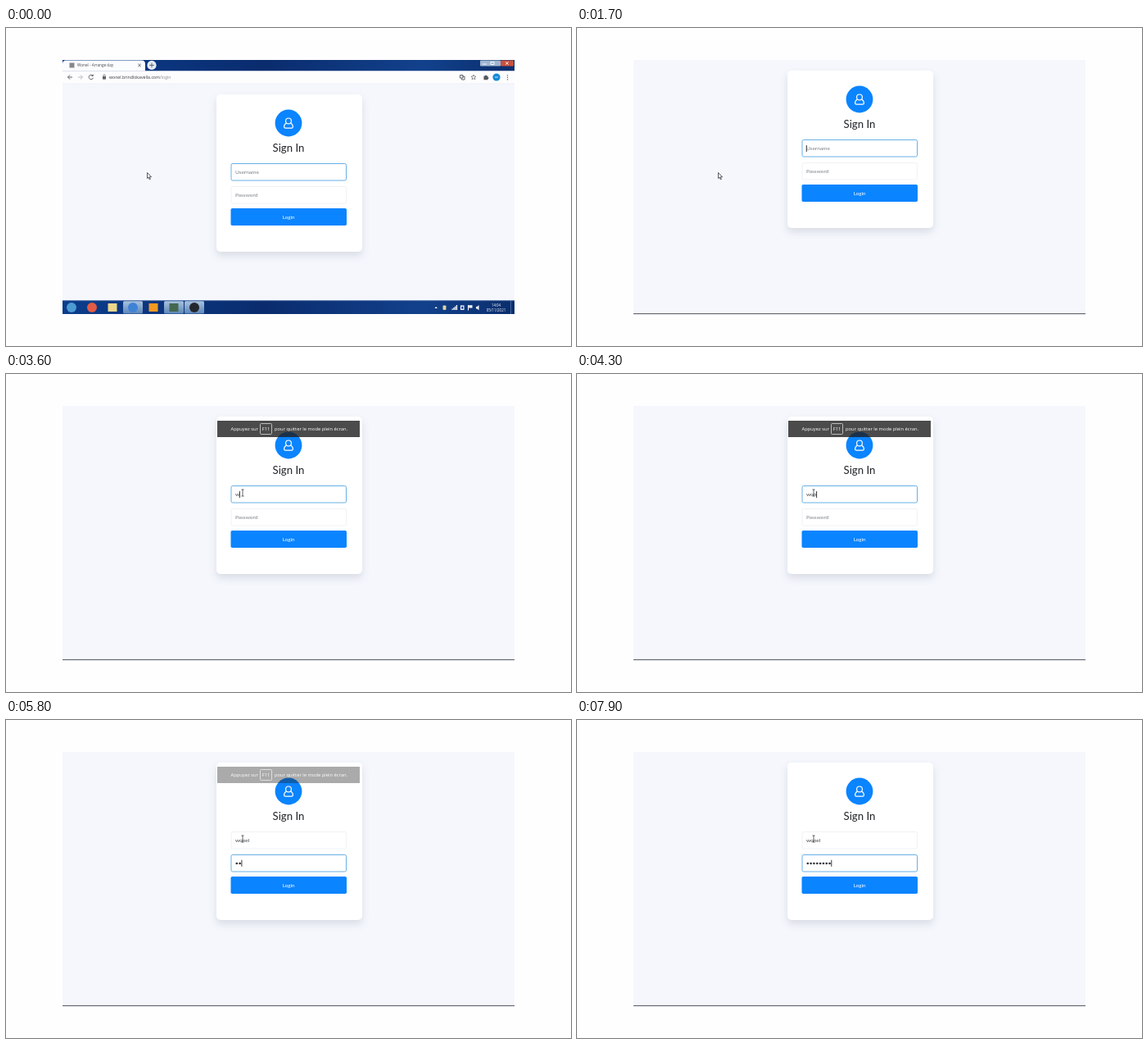
Write an HTML page that moves like this. It is 690 px wide and 388 px high and loops after 8000 ms.

```html
<!DOCTYPE html>
<html lang="en">
<head>
<meta charset="utf-8">
<title>Sign in</title>
<style>
  html, body { margin: 0; width: 100%; height: 100%; overflow: hidden; background: #fefefe; }
  svg { display: block; width: 690px; height: 388px; }
  text { font-family: "Open Sans", "Noto Sans", sans-serif; white-space: pre; }
  #form text { font-family: Lato, sans-serif; font-size: 6.5px; fill: #41464b; }
  #form .hint { fill: #7b8289; }
  #form .title { font-size: 13.2px; fill: #212529; }
  #form .button { font-size: 6.3px; fill: #fff; }
  .mid { text-anchor: middle; }
  .field { fill: #fff; stroke: #f1f2f4; }
  .focus { stroke: #68b0e6; }
  .line { fill: none; stroke: #5f6368; stroke-width: 1; }
  .card { filter: drop-shadow(0 5px 5px rgba(40, 50, 70, .13)); }
  #toast text { font-size: 5.8px; fill: #fff; }
</style>
</head>
<body>
<svg viewBox="0 0 690 388">
  <defs>
    <linearGradient id="bar">
      <stop offset="0" stop-color="#0b3d8c"/>
      <stop offset=".45" stop-color="#0a2c6e"/>
      <stop offset=".8" stop-color="#12418c"/>
      <stop offset="1" stop-color="#0a2d6c"/>
    </linearGradient>
    <linearGradient id="lit" x2="0" y2="1">
      <stop offset="0" stop-color="#a9c3df"/>
      <stop offset="1" stop-color="#5d86b8"/>
    </linearGradient>
  </defs>

  <rect x="69" y="39" width="552" height="310" fill="#f5f7fd"/>
  <rect id="edge" x="69" y="348" width="552" height="1.2" fill="#656a78"/>

  <g id="form">
    <rect class="card" x="257" y="81" width="178" height="192" rx="5" fill="#fff"/>
    <circle cx="345" cy="116" r="16.4" fill="#0a84ff"/>
    <g fill="none" stroke="#fff" stroke-width="1.2">
      <circle cx="345" cy="113.4" r="3.4"/>
      <path d="M342.3 116.2c-2 .9-2.7 2.4-2.7 4.3q0 1.7 1.6 1.7h7.6q1.6 0 1.6-1.7c0-1.9-.7-3.4-2.7-4.3"/>
    </g>
    <text class="title mid" x="345" y="150.6">Sign In</text>
    <rect id="nameBox" class="field" x="275" y="165.5" width="140.5" height="20.5" rx="1.8"/>
    <text id="name" x="280" y="178.4"></text>
    <rect id="passBox" class="field" x="275" y="193.5" width="140.5" height="20.5" rx="1.8"/>
    <text id="pass" class="hint" x="280" y="206">Password</text>
    <g id="dots" fill="#33383d"></g>
    <rect id="caret" width=".9" height="8" fill="#222"/>
    <rect x="274.5" y="220" width="141.5" height="21" rx="1.8" fill="#0a84ff"/>
    <text class="button mid" x="345.2" y="232.6">Login</text>
  </g>

  <g id="browser">
    <rect x="69" y="39" width="552" height="13.5" fill="url(#bar)"/>
    <path d="M69 52.5V44q0-4.5 4-4.5h93q4 0 4 4.5v8.5z" fill="#fbfcfe"/>
    <rect x="77.5" y="42.5" width="6" height="6" fill="#85898e"/>
    <text x="87" y="47.3" font-size="4.7" fill="#44484d">Wonel - Arrange day</text>
    <path class="line" d="M161.4 43.8l3.4 3.4m0-3.4l-3.4 3.4"/>
    <circle cx="178" cy="45.4" r="5.6" fill="#e3ebf6"/>
    <path class="line" d="M175.2 45.4h5.6m-2.8-2.8v5.6"/>
    <rect x="579" y="39.5" width="25" height="7" rx="1" fill="#9fb5d2"/>
    <rect x="604" y="39.5" width="16" height="7" rx="1" fill="#c9513f"/>
    <path d="M582 44h5m5-2.5h4v3h-4zM610 41.3l3.6 3.4m0-3.4l-3.6 3.4" stroke="#fff" fill="none" stroke-width=".9"/>
    <rect x="69" y="52.5" width="552" height="15.5" fill="#fdfdfe"/>
    <path d="M69 68h552" stroke="#e9ebef" stroke-width=".8"/>
    <path class="line" d="M81 60h-5.5m2.6-2.6L75.500 60l2.600 2.600"/>
    <path class="line" d="M88 60h5.500m-2.600-2.600L93.500 60l-2.600 2.600" style="stroke:#b9bcc1"/>
    <path class="line" d="M106 58.200a2.700 2.700 0 1 0 .5 2.500m-.2-4v1.800h-1.800"/>
    <rect x="118" y="59" width="4" height="3.600" fill="#5f6368"/>
    <path class="line" d="M118.800 59v-1a1.200 1.200 0 0 1 2.400 0v1" style="stroke-width:.7"/>
    <text x="126" y="62" font-size="5.2" fill="#34373b">wonel.brindlokavella.com<tspan fill="#85898e">/login</tspan></text>
    <path d="M554.500 57.500h3.500v3.500h-3.500zm3 1.500h2.500v4h-3.500v-1.500" class="line"/>
    <path d="M571 57l.9 2 2.100.2-1.600 1.400.5 2.100-1.900-1.100-1.900 1.100.5-2.100-1.600-1.400 2.100-.2z" class="line" style="stroke-width:.7"/>
    <path d="M583.500 58.500h1.500a1 1 0 0 1 2 0h1.500v1.500a1 1 0 0 1 0 2v1.200h-5z" fill="#53575c"/>
    <circle cx="599" cy="60" r="4.600" fill="#168ad8"/>
    <path d="M597 60h4" stroke="#cfe8fa"/>
    <path d="M612.500 57.200v6.500" stroke="#5f6368" stroke-width="1.200" stroke-dasharray="1.200 1.300"/>

    <rect x="69" y="332.500" width="552" height="16.500" fill="url(#bar)"/>
    <path d="M69 332.800h552" stroke="#44699f" stroke-width=".6"/>
    <g id="tasks"></g>
    <g fill="#fff">
      <path d="M523.500 342l1.700-2 1.700 2z"/>
      <rect x="533.500" y="338.500" width="4" height="5.500" rx="1" fill="#d8d4a6"/>
      <path d="M544.500 344v-1.500h1.300v1.500zm1.800 0v-3h1.300v3zm1.800 0v-4.500h1.300v4.500zm1.800 0v-6h1.200v6z"/>
      <path d="M555 338.500h4.500v5.500H555zm1.200 1.200v3h2.200v-3z" fill-rule="evenodd"/>
      <path d="M564 338h1v6.500h-1zm1.200.3h4.300v3.200h-4.300z"/>
      <path d="M574 340h1.500l2-2v6.500l-2-2H574z"/>
    </g>
    <g class="mid" font-size="4.400" fill="#fff">
      <text x="598.500" y="339.800">14:04</text>
      <text x="598.500" y="346.300">05/11/2021</text>
    </g>
    <path d="M616.500 333v16" stroke="#5f82b4" stroke-width=".7"/>
  </g>

  <g id="toast">
    <rect x="258" y="57" width="174" height="20" fill="rgba(30,30,30,.8)"/>
    <rect x="310.500" y="60.500" width="14" height="13" rx="1" fill="none" stroke="#d8d8d8" stroke-width=".8"/>
    <text x="274.500" y="69.200">Appuyez sur</text>
    <text class="mid" x="317.500" y="69.200">F11</text>
    <text x="328" y="69.200">pour quitter le mode plein écran.</text>
  </g>

  <path id="arrow" d="M0 0v7l1.600-1.400 1.100 2.700 1.200-.5-1.100-2.600h2.200z" fill="#fff" stroke="#30343a" stroke-width=".8"/>
  <path id="beam" d="M-1.500-4h3M0-4v8M-1.500 4h3" fill="none" stroke="#3a3d42" stroke-width=".8"/>
</svg>

<script>
const LOOP = 8000, FULLSCREEN = 1650, BLINK = 530, LOGIN = 'wonel', PITCH = 3.82;
// Key presses: five letters, Tab, eight password characters.
const KEYS = [3550, 4200, 4300, 4400, 4500, 4700, 5100, 5750, 6950, 7150, 7680, 7680, 7680, 7850];

const $ = id => document.getElementById(id);
const show = (el, on) => { el.style.display = on ? '' : 'none'; };
const ramp = (t, from, to) => Math.min(1, Math.max(0, (t - from) / (to - from)));

function add(parent, tag, attrs) {
  const el = document.createElementNS('http://www.w3.org/2000/svg', tag);
  for (const key in attrs) el.setAttribute(key, attrs[key]);
  return parent.appendChild(el);
}

// Taskbar icons: centre, colour, round, highlighted.
[
  [80, '#4c9bd3', 1, 0], [105, '#e35b45', 1, 0], [130, '#ecd68a', 0, 0], [155, '#3f83d6', 1, 1],
  [180, '#f39a22', 0, 0], [205, '#44684f', 0, 1], [230, '#24272c', 1, 1]
].forEach(([x, fill, round, lit]) => {
  if (lit) add($('tasks'), 'rect', { x: x - 12, y: 333.2, width: 24, height: 15.4, rx: 1.5, fill: 'url(#lit)' });
  if (round) add($('tasks'), 'circle', { cx: x, cy: 341, r: 6, fill });
  else add($('tasks'), 'rect', { x: x - 5.5, y: 336, width: 11, height: 10, fill });
});

const dots = Array.from({ length: 8 }, (_, i) =>
  add($('dots'), 'circle', { cx: 281.8 + PITCH * i, cy: 204, r: 1.35 }));

function drawForm(t) {
  const pressed = KEYS.filter(k => k <= t).length;
  const inPass = pressed > LOGIN.length;
  const count = Math.max(0, pressed - LOGIN.length - 1);
  const typed = LOGIN.slice(0, pressed);
  const name = $('name');

  name.textContent = typed || 'Username';
  name.classList.toggle('hint', !typed);
  $('nameBox').classList.toggle('focus', !inPass);
  $('passBox').classList.toggle('focus', inPass);
  show($('pass'), !count);
  dots.forEach((dot, i) => show(dot, i < count));

  const width = inPass ? PITCH * count : typed ? name.getComputedTextLength() : 0;
  const since = t - (pressed ? KEYS[pressed - 1] : -920);
  $('caret').setAttribute('x', 279.8 + width);
  $('caret').setAttribute('y', inPass ? 199.8 : 172);
  show($('caret'), since % (2 * BLINK) < BLINK);
}

function drawPointer(t) {
  const p = ramp(t, 1800, 2250), ease = p * p * (3 - 2 * p);
  const x = 172.5 + 116.5 * ease, y = 176.5 - 31.5 * ease;
  const overText = x > 275;
  for (const id of ['arrow', 'beam']) $(id).setAttribute('transform', `translate(${x} ${y})`);
  show($('arrow'), !overText);
  show($('beam'), overText);
}

function draw(now) {
  const t = now % LOOP, full = t >= FULLSCREEN;
  show($('browser'), !full);
  show($('edge'), full);
  $('form').setAttribute('transform', `translate(0 ${full ? -29 : 0})`);
  $('toast').style.opacity = ramp(t, 1800, 2000) * (1 - ramp(t, 5600, 5980));
  drawForm(t);
  drawPointer(t);
}

const start = performance.now();
(function frame() {
  draw(performance.now() - start);
  requestAnimationFrame(frame);
})();
</script>
</body>
</html>
```
